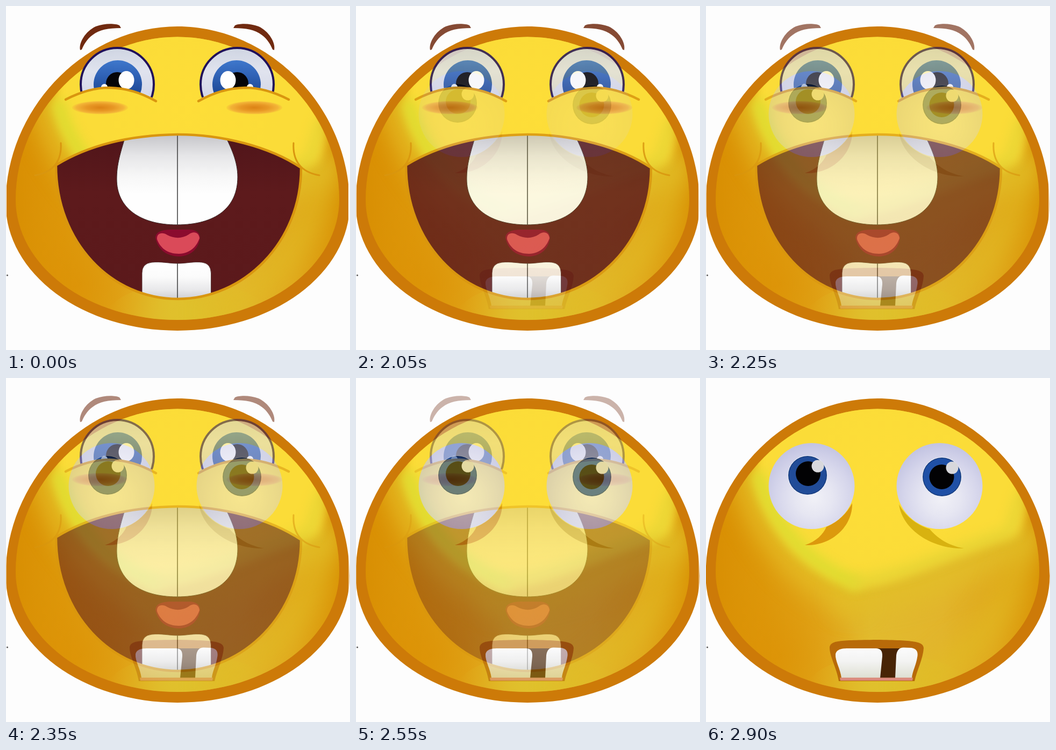
Animation of 640x640 px, one loop 5.89 s. Source, as an HTML page with a canvas:

```html
<!DOCTYPE html>
<html lang="en">
<head>
<meta charset="utf-8">
<title>Two smiles</title>
<style>
html, body { margin: 0; width: 100%; height: 100%; overflow: hidden; background: #fdfdfd; }
canvas { display: block; width: 100vw; height: 100vh; }
</style>
</head>
<body>
<canvas id="stage" width="640" height="640"></canvas>
<script>
const SIZE = 640, LOOP = 5890, FADE_START = 1900, STEP = 50, STEPS = 20;
const GOLD = '#d9960f';

function layer(draw) {
  const c = document.createElement('canvas');
  c.width = c.height = SIZE;
  draw(c.getContext('2d'));
  return c;
}

function fill(g, d, color) {
  g.fillStyle = color;
  g.fill(new Path2D(d));
}

function line(g, d, color, width) {
  g.strokeStyle = color;
  g.lineWidth = width;
  g.lineCap = g.lineJoin = 'round';
  g.stroke(new Path2D(d));
}

function oval(g, x, y, rx, ry, color) {
  g.fillStyle = color;
  g.beginPath();
  g.ellipse(x, y, rx, ry, 0, 0, Math.PI * 2);
  g.fill();
}

const disc = (g, x, y, r, color) => oval(g, x, y, r, r, color);

function stops(grad, list) {
  list.forEach(([at, color]) => grad.addColorStop(at, color));
  return grad;
}

const down = (g, y0, y1, ...list) => stops(g.createLinearGradient(0, y0, 0, y1), list);
const across = (g, x0, x1, ...list) => stops(g.createLinearGradient(x0, 0, x1, 0), list);
const glow = (g, x, y, r, ...list) => stops(g.createRadialGradient(x, y, 0, x, y, r), list);

function clipped(g, d, draw) {
  g.save();
  g.clip(new Path2D(d));
  draw();
  g.restore();
}

function blurred(g, radius, draw) {
  g.filter = `blur(${radius}px)`;
  draw();
  g.filter = 'none';
}

// Runs a drawing twice, the second time flipped across the face's axis.
function mirrored(g, draw) {
  draw();
  g.save();
  g.translate(637, 0);
  g.scale(-1, 1);
  draw();
  g.restore();
}

// Closed egg: round below, with slightly flatter shoulders above.
function egg(left, top, right, bottom, cx, cy) {
  const k = 0.538, up = (cy - top) * k;
  const shoulders = `C${left} ${cy - up} ${cx - (cx - left) * k} ${top} ${cx} ${top}`
    + `C${cx + (right - cx) * k} ${top} ${right} ${cy - up} ${right} ${cy}`;
  const base = `A${right - cx} ${bottom - cy} 0 0 1 ${cx} ${bottom}A${cx - left} ${bottom - cy} 0 0 1 ${left} ${cy}`;
  return `M${left} ${cy}${shoulders}${base}Z`;
}

function head(g) {
  g.fillStyle = '#fdfdfd';
  g.fillRect(0, 0, SIZE, SIZE);
  disc(g, 2.5, 501, 1.5, '#555');
  fill(g, egg(-0.5, 38, 639.5, 604, 319, 368), '#cd7a08');
  clipped(g, egg(18, 57.5, 620, 584, 319, 360), () => {
    g.fillStyle = across(g, 18, 620, [0, '#d98f03'], [0.15, '#dd980a'], [0.32, '#e1a81c'],
      [0.48, '#e2bb2e'], [0.7, '#e2b52c'], [0.86, '#e0a81c'], [1, '#da9406']);
    g.fillRect(0, 0, SIZE, SIZE);
    disc(g, 130, 520, 160, glow(g, 130, 520, 160, [0, 'rgba(220,145,5,.7)'], [1, 'rgba(220,145,5,0)']));
    oval(g, 340, 575, 150, 60, glow(g, 340, 575, 150, [0, 'rgba(222,196,42,.7)'], [1, 'rgba(222,196,42,0)']));
    blurred(g, 22, () => {
      line(g, 'M80 180C100 270 165 360 270 405', 'rgba(229,188,36,.9)', 62);
      line(g, 'M270 405C370 400 470 365 585 300', 'rgba(227,190,42,.9)', 60);
      line(g, 'M590 300C575 410 530 490 400 570', 'rgba(226,188,36,.6)', 48);
    });
    blurred(g, 9, () => {
      fill(g, 'M92 130L92 185C113 270 170 352 278 388C360 380 440 335 578 290C600 250 594 205 575 150L540 0H120Z', '#fbdc38');
    });
    blurred(g, 10, () => {
      line(g, 'M98 185C120 265 183 345 276 380', '#dfdc30', 27);
      line(g, 'M276 380C360 370 440 328 565 287L586 220', 'rgba(228,212,52,.75)', 24);
    });
    disc(g, 340, 190, 170, glow(g, 340, 190, 170, [0, 'rgba(254,222,56,.9)'], [1, 'rgba(254,222,56,0)']));
  });
}

function happyEye(g) {
  clipped(g, 'M60 0H300V184C255 160 225 152 190 152C160 153 135 162 112 174H60Z', () => {
    disc(g, 207, 146, 68, down(g, 78, 165, [0, '#cfd5e2'], [0.5, '#e0e3ee'], [1, '#d5d8e8']));
    disc(g, 208, 146, 45, down(g, 100, 160, [0, '#3f78cc'], [0.45, '#3164b8'], [1, '#1f4a98']));
    disc(g, 207, 144, 21, '#050408');
    oval(g, 224, 138, 14.5, 17, '#fff');
    disc(g, 183, 151, 6, '#fff');
    g.strokeStyle = '#20105a';
    g.lineWidth = 4;
    g.beginPath();
    g.arc(207, 146, 68, 0, Math.PI * 2);
    g.stroke();
  });
  line(g, 'M111 174C140 159 165 152 192 152C225 153 250 161 279 177', GOLD, 4.5);
}

function happyFeatures(g) {
  g.fillStyle = '#fdfdfd';
  g.fillRect(0, 320, 1, 90);
  g.fillRect(637, 320, 3, 100);

  mirrored(g, () => {
    fill(g, 'M138 82C135 68 148 47 167 38C182 32 203 32 211 36L214 41C190 41 174 44 161 54C150 62 145 72 141 81Z', '#702a10');
    happyEye(g);
    g.save();
    g.translate(175, 189);
    g.scale(1, 0.24);
    disc(g, 0, 0, 52, glow(g, 0, 0, 52, [0, '#dc8215'], [0.5, '#e89825'],
      [0.85, 'rgba(242,175,55,.9)'], [1, 'rgba(245,190,55,.35)']));
    g.restore();
    line(g, 'M102 255C104 286 90 309 54 315', GOLD, 3);
  });

  const mouth = 'M93 296C160 255 240 240 320 239C400 239 490 261 549 301C549 440 442 545 320 545C196 545 93 440 93 296Z';
  fill(g, mouth, down(g, 240, 545, [0, '#50151a'], [0.35, '#5d1a1c'], [1, '#5b191b']));
  clipped(g, mouth, () => {
    const upper = 'M226 230C212 275 206 295 206 322C206 376 250 407 318 407C390 407 431 375 431 318C431 290 420 265 402 230Z';
    fill(g, upper, down(g, 240, 350, [0, '#c6c6ca'], [0.35, '#e6e6e8'], [0.7, '#f7f7f7'], [1, '#fefefe']));
    line(g, upper, '#3b2a2a', 1);
    line(g, 'M319 236V407', '#444', 1.6);

    fill(g, 'M278 431C279 419 291 417 304 416H340C353 416 361 421 361 432C358 452 344 465 322 466C298 465 283 454 278 431Z', '#8b0b2e');
    fill(g, 'M281 434C280 422 291 420 300 426C313 433 328 433 340 425C349 418 359 421 360 432C354 449 342 460 322 461C300 461 287 450 281 434Z', '#da4a59');

    const lower = 'M253 560V497Q253 479 271 477C288 475 303 479 319 479C336 479 350 475 365 477Q381 479 381.5 497V560Z';
    fill(g, lower, down(g, 477, 545, [0, '#fff'], [0.4, '#fbfbfb'], [0.75, '#e8e8ea'], [1, '#cfcfd2']));
    line(g, lower, '#4a2a2a', 0.8);
    line(g, 'M319 479V545', '#444', 1.6);
  });
  line(g, mouth, GOLD, 4.5);
}

function wideEye(g, x, iris, pupil, shine, blue) {
  disc(g, x, 201, 80, glow(g, x + 4, 222, 100, [0, '#f1f1f7'], [0.35, '#e6e6f2'], [0.7, '#d5d5eb'], [1, '#c3c4e2']));
  disc(g, ...iris, 37, '#e9edf7');
  disc(g, ...iris, 36, '#173b7c');
  disc(g, ...iris, 34.5, blue);
  disc(g, ...pupil, 23, '#020204');
  disc(g, ...shine, 11.5, '#d8d8dc');
}

function goofyFeatures(g) {
  fill(g, 'M272 233C273 276 234 313 184 311C205 304 218 291 224 277C245 268 262 252 272 233Z', '#dc990d');
  fill(g, 'M359 235C366 285 425 319 480 317C448 311 430 297 416 281C390 273 370 255 359 235Z', '#d8b210');
  wideEye(g, 196.5, [189, 181], [190, 178], [208, 164], '#214c98');
  wideEye(g, 434.5, [439, 184], [438.5, 184], [458, 167], '#1f50a6');

  fill(g, 'M230 502C231 488 248 488 318 487C386 488 404 490 405 502C404 522 392 545 388 564H247C244 542 230 518 230 502Z', '#b86a09');
  fill(g, 'M318 503H362L356 558H318Z', '#482406');
  const enamel = down(g, 502, 558, [0, '#fbfbfc'], [0.45, '#f3f3f2'], [1, '#dedfd2']);
  fill(g, 'M241 514C243 504 254 503 265 503H316Q329 503 328 518L324 558H252C250 541 240 526 241 514Z', enamel);
  fill(g, 'M352 558L354 516Q356 501 368 501.5L382 502Q395 504 393.5 517C391 535 384 545 383 558Z', enamel);
  fill(g, 'M249 557.5H385L384 563H250Z', '#db8a7c');
}

const happy = layer(g => { head(g); happyFeatures(g); });
const goofy = layer(g => { head(g); goofyFeatures(g); });
const ctx = document.getElementById('stage').getContext('2d');
const start = performance.now();

function frame(now) {
  const t = Math.max(0, now - start) % LOOP;
  const step = Math.floor((t - FADE_START) / STEP);
  ctx.globalAlpha = 1;
  ctx.drawImage(happy, 0, 0);
  ctx.globalAlpha = Math.min(1, Math.max(0, step / STEPS));
  ctx.drawImage(goofy, 0, 0);
  requestAnimationFrame(frame);
}
frame(start);
</script>
</body>
</html>
```
